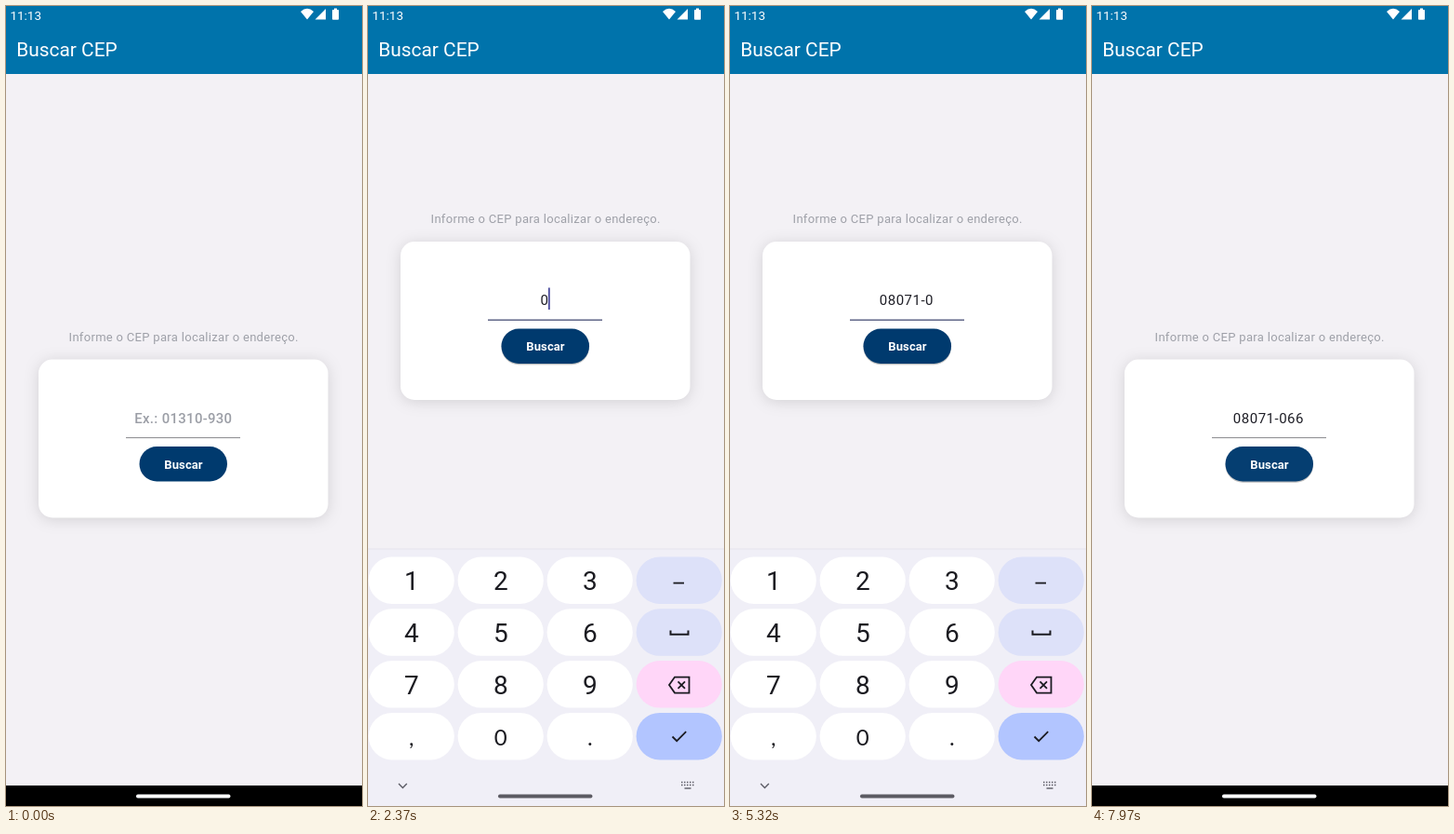
Animation of 383x859 px, one loop 8 s. Source, as an HTML page:

```html
<!DOCTYPE html>
<html lang="pt-BR">
<head>
<meta charset="utf-8">
<title>Buscar CEP</title>
<style>
  html, body { margin: 0; height: 100%; overflow: hidden; background: #f3f1f5; }
  svg { display: block; width: 100%; height: 100%; font-family: Roboto, sans-serif; }
  .mid { text-anchor: middle; }
  .low { font-family: Lato, sans-serif; }
  .card { filter: drop-shadow(0 2px 8px rgba(0, 0, 0, .13)); }
  .icon { fill: none; stroke: #1b1b21; stroke-width: 2; }
  .chrome { fill: none; stroke: #5c5c66; stroke-width: 1.4; }
</style>
</head>
<body>
<svg viewBox="0 0 383 859">
  <rect width="383" height="859" fill="#f3f1f5"/>
  <rect width="383" height="73" fill="#0073ab"/>
  <g fill="#fff">
    <text x="4.4" y="14.5" font-size="13.5">11:13</text>
    <path d="M317 6Q324-.5 331 6L324 14.5ZM344 3V14.5H332.5Z"/>
    <path d="M353 4V2.5h3V4h1.2q.8 0 .8.8v9q0 .9-.8.9h-5.4q-.8 0-.8-.9v-9q0-.8.8-.8z"/>
    <text x="11.2" y="53.5" font-size="20.9">Buscar CEP</text>
  </g>

  <g id="content">
    <text class="mid" x="191.2" y="359.7" font-size="13.03" letter-spacing=".3" fill="#9ea0a8">Informe o CEP para localizar o endereço.</text>
    <rect class="card" x="35" y="379.5" width="311.5" height="170" rx="15" fill="#fff"/>
    <text id="hint" class="mid" x="190.8" y="447.5" font-size="14.9" font-weight="500" letter-spacing=".35" fill="#9b9ea6">Ex.: 01310-930</text>
    <text id="value" class="mid" x="189.9" y="447.5" font-size="15" letter-spacing=".5" fill="#1f1f27"></text>
    <rect id="cursor" y="429" width="1.9" height="23.5" fill="#4f50a0"/>
    <rect id="underline" x="129" y="463" width="123" height="1.1"/>
    <rect id="lift" x="143.5" y="474.2" width="94.5" height="37.5" rx="18.7" fill="#000" opacity=".25"/>
    <rect x="143.5" y="473" width="94.5" height="37.5" rx="18.7" fill="#003a6e"/>
    <rect id="press" x="143.5" y="473" width="94.5" height="37.5" rx="18.7" fill="#fff"/>
    <text class="mid" x="191" y="496.6" font-size="13.03" font-weight="700" letter-spacing=".1" fill="#fff">Buscar</text>
  </g>

  <rect y="837" width="383" height="22" fill="#000"/>

  <g id="keyboard">
    <rect y="582.5" width="383" height="277" fill="#f0eff7"/>
    <rect y="582.5" width="383" height="1" fill="#e7e6ed"/>
    <g id="keys"></g>
    <g class="icon">
      <path d="M328.5 619.6h11.5" stroke-width="1.8"/>
      <path d="M325.5 670.5v4.3h19v-4.3"/>
      <path d="M330 720.6h15.5v17H330l-6-8.5zM333.5 725.3l7.5 7.5m0-7.5l-7.5 7.5" stroke-width="1.8"/>
      <path d="M327.5 784.5l4.7 4.7 10-10" stroke-width="1.8"/>
    </g>
    <path class="chrome" d="M33 835l4.4 4.4 4.4-4.4"/>
    <path class="chrome" stroke-dasharray="1.5 1.5" d="M337 833.5h15M337 836.5h15"/>
    <path class="chrome" d="M340.5 840h7"/>
  </g>
  <rect id="handle" x="140" y="846.5" width="101.5" height="3.9" rx="1.9"/>
</svg>

<script>
const LOOP = 8000, PANEL_HEIGHT = 276.5, STAGE_HEIGHT = 859, NAV_TOP = 837;
const CONTENT_RISE = 126.5, CONTENT_LAG = 24;
const SOFT = '#dde1f9';
const $ = id => document.getElementById(id);
const clamp = x => Math.min(1, Math.max(0, x));
const ramp = (t, from, to) => clamp((t - from) / (to - from));
const set = (node, attrs) => Object.entries(attrs).forEach(([k, v]) => node.setAttribute(k, v));
const mix = (a, b, k) => `rgb(${a.map((v, i) => Math.round(v + (b[i] - v) * k))})`;

function add(tag, attrs, text = '') {
  const node = document.createElementNS('http://www.w3.org/2000/svg', tag);
  set(node, attrs);
  node.textContent = text;
  return $('keys').appendChild(node);
}

const keys = {};
['123_', '456 ', '789<', ',0.>'].forEach((row, r) => [...row].forEach((label, c) => {
  const x = .6 + 96 * c, y = 591.5 + 55.8 * r, low = r === 3;
  const fill = c < 3 ? '#fff' : [SOFT, SOFT, '#ffd6f8', '#b2c5ff'][r];
  keys[label] = add('rect', { x, y, width: 92.2, height: 50.5, rx: 25.2, fill });
  if (c < 3) {
    add('text', {
      class: low ? 'mid low' : 'mid', x: x + 46.2, y: y + 35.5,
      'font-size': low ? 24 : 28, fill: '#1b1b21'
    }, label);
  }
}));

// Each stroke: key, finger down, character entered, finger up, resulting text
const strokes = [
  ['0', 1940, 2070, 2070, '0'],
  ['8', 2570, 2660, 2660, '08'],
  ['0', 2990, 3080, 3080, '080'],
  ['7', 3420, 3490, 3490, '0807'],
  ['1', 3990, 4080, 4080, '08071'],
  ['0', 4750, 4820, 4820, '08071-0'],
  ['6', 5620, 5690, 5760, '08071-06'],
  ['6', 5930, 6000, 6000, '08071-066']
];
const cursorSpans = [[540, 880], [1410, 1940], ...strokes.map(s => [s[2], s[2] + 500])];

// Cubic bezier (0.2, 0, 0, 1), solved by bisection
function ease(x) {
  let lo = 0, hi = 1;
  for (let i = 0; i < 24; i++) {
    const s = (lo + hi) / 2;
    if (.6 * s * (1 - s) ** 2 + s ** 3 < x) lo = s; else hi = s;
  }
  return lo * lo * (3 - 2 * lo);
}

const panelTop = t =>
  STAGE_HEIGHT - PANEL_HEIGHT * (ease(ramp(t, 495, 870)) - ease(ramp(t, 6680, 7090)));

// The content stays centred in the space above the panel, slightly behind it
function contentShift(t) {
  const openTop = STAGE_HEIGHT - PANEL_HEIGHT;
  return -CONTENT_RISE * ramp(panelTop(t - CONTENT_LAG), NAV_TOP, openTop);
}

function handleShade(t) {
  if (t >= 7330) return 1 - ramp(t, 7330, 7750);
  return t < 1060 ? 0 : t < 1270 ? .5 : t < 1700 ? .9 : 1;
}

function draw(t) {
  const panelOffset = panelTop(t) - STAGE_HEIGHT + PANEL_HEIGHT;
  set($('keyboard'), { transform: `translate(0 ${panelOffset})` });
  set($('content'), { transform: `translate(0 ${contentShift(t)})` });

  const entered = strokes.filter(s => t >= s[2]).pop();
  $('value').textContent = entered ? entered[4] : '';
  const width = entered ? $('value').getComputedTextLength() : 0;
  const blinkOn = cursorSpans.some(([from, to]) => t >= from && t < to);
  set($('cursor'), { x: 189.4 + width / 2, opacity: blinkOn ? 1 : 0 });
  set($('hint'), { opacity: 1 - ramp(t, 2070, 2340) });

  const focus = ramp(t, 500, 700) - ramp(t, 6620, 6820);
  set($('underline'), { fill: mix([146, 146, 150], [72, 78, 118], focus), height: 1.1 + .2 * focus });
  set($('lift'), { opacity: t > 880 ? .25 : 0 });
  set($('press'), { opacity: .02 * ramp(t, 7580, 7900) });

  for (const digit of '01678') {
    const down = strokes.some(s => s[0] === digit && t >= s[1] && t < s[3]);
    set(keys[digit], { fill: down ? SOFT : '#fff' });
  }
  set($('handle'), { fill: mix([250, 252, 255], [92, 91, 99], handleShade(t)) });
}

const start = performance.now();
function tick() {
  draw((performance.now() - start) % LOOP);
  requestAnimationFrame(tick);
}
tick();
</script>
</body>
</html>
```
